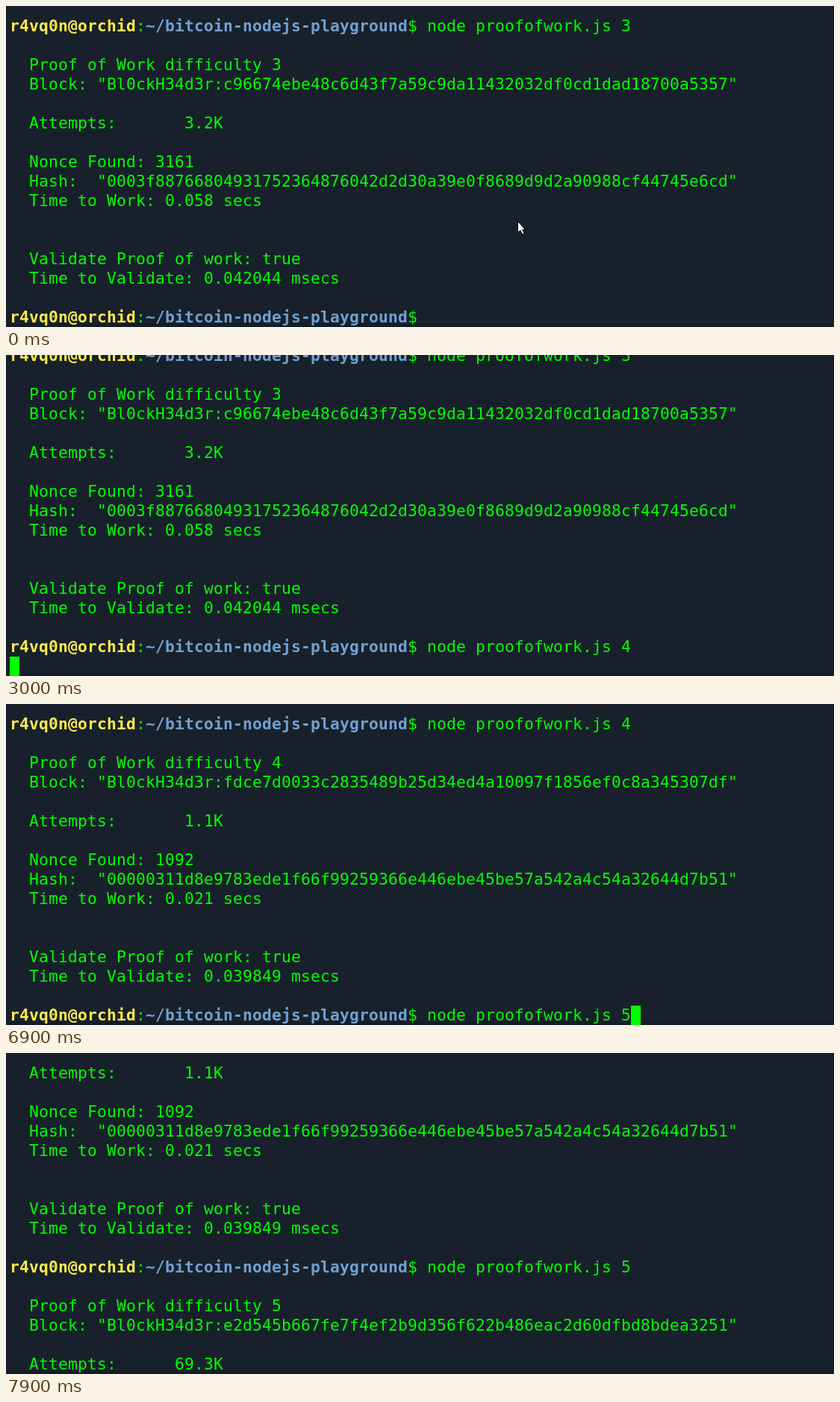
Recreate the animation shown at these times as an HTML page. Size 1109 by 430 pixels, loop 8000 ms.

```html
<!DOCTYPE html>
<html lang="en">
<head>
<meta charset="utf-8">
<title>Proof of work terminal</title>
<style>
  html, body { margin: 0; width: 100%; height: 100%; overflow: hidden; background: #18212b; }
  #stage { position: relative; width: 1109px; height: 430px; overflow: hidden; background: #18212b; }
  #edge { position: absolute; inset: 0; border: solid #141c28; border-width: 0 2px 4px 0; }
  #screen {
    position: absolute; left: 5px; top: 14px; margin: 0;
    font: 21.333px/26px "DejaVu Sans Mono", monospace;
    letter-spacing: calc(13px - 1ch);
    color: #0f0; white-space: pre;
  }
  #screen div { height: 26px; }
  b { font-weight: 700; }
  .user { color: #fce94f; }
  .path { color: #729fcf; }
  #cursor { position: absolute; top: 404px; width: 13px; height: 26px; background: #0f0; }
  #pointer { position: absolute; left: 684px; top: 287px; }
</style>
</head>
<body>
<div id="stage">
  <div id="edge"></div>
  <div id="screen"></div>
  <div id="cursor"></div>
  <svg id="pointer" width="13" height="21">
    <path d="M1.5 1.5V16.5L5 13.5L7.6 19L10 18L7.6 12.5H11.5Z" fill="#fff" stroke="#000"/>
  </svg>
</div>
<script>
const LOOP = 8000, CELL = 13, ROW = 26, LEFT = 5;
const COMMAND = 'node proofofwork.js ';
const $ = id => document.getElementById(id);
const screen = $('screen'), cursor = $('cursor'), pointer = $('pointer');

const prompt = '<b class="user">r4vq0n@orchid</b>:' +
  '<b class="path">~/bitcoin-nodejs-playground</b>$ <span class="cmd"></span>';
const attempts = count => '  Attempts:' + count.padStart(11);

const run = (level, block, count, nonce, hash, work, check) => [
  prompt,
  '',
  `  Proof of Work difficulty ${level}`,
  `  Block: "Bl0ckH34d3r:${block}"`,
  '',
  attempts(count),
  '',
  `  Nonce Found: ${nonce}`,
  `  Hash:  "${hash}"`,
  `  Time to Work: ${work} secs`,
  '',
  '',
  '  Validate Proof of work: true',
  `  Time to Validate: ${check} msecs`,
  ''
];

const lines = [
  ...run(3, 'c96674ebe48c6d43f7a59c9da11432032df0cd1dad18700a5357', '3.2K', 3161,
    '0003f88766804931752364876042d2d30a39e0f8689d9d2a90988cf44745e6cd', '0.058', '0.042044'),
  ...run(4, 'fdce7d0033c2835489b25d34ed4a10097f1856ef0c8a345307df', '1.1K', 1092,
    '00000311d8e9783ede1f66f99259366e446ebe45be57a542a4c54a32644d7b51', '0.021', '0.039849'),
  ...run(5, 'e2d545b667fe7f4ef2b9d356f622b486eac2d60dfbd8bdea3251', '', '', '', '', '').slice(0, 6)
];
screen.innerHTML = lines.map(line => `<div>${line}</div>`).join('');
const commands = screen.querySelectorAll('.cmd');
const counter = screen.lastElementChild;
commands[0].textContent = COMMAND + 3;

// time, first visible line, command argument (null: nothing typed), cursor column (-1: hidden)
const steps = [
  [0, 0, null, -1],
  [400, 0, '3', 64],
  [1000, 0, '3', -1],
  [1600, 0, '', 63],
  [1900, 0, '4', 64],
  [2700, 0, '4', -1],
  [3000, 1, '4', 0],
  [3100, 15, null, 43],
  [3600, 15, null, -1],
  [3900, 15, '4', 64],
  [4500, 15, '4', -1],
  [5100, 15, '', 63],
  [5700, 15, '5', 64],
  [6300, 15, '5', -1],
  [6900, 15, '5', 64],
  [7200, 16, '5', 0],
  [7300, 20, '5', -1]
];

function render(t) {
  const [, top, arg, column] = steps.findLast(step => step[0] <= t);
  const typed = arg === null ? '' : COMMAND + arg;
  const second = top >= 15;
  commands[1].textContent = second ? COMMAND + 4 : typed;
  commands[2].textContent = second ? typed : '';
  screen.style.transform = `translateY(${-top * ROW}px)`;
  cursor.style.display = column < 0 ? 'none' : 'block';
  cursor.style.left = LEFT + column * CELL + 'px';
  pointer.style.display = t < 400 ? 'block' : 'none';
  const ticks = Math.max(1, Math.floor((t - 7200) / 100));
  counter.textContent = attempts((ticks * 9.9).toFixed(1) + 'K');
}

const start = performance.now();
function frame() {
  render((performance.now() - start) % LOOP);
  requestAnimationFrame(frame);
}
frame();
</script>
</body>
</html>
```
